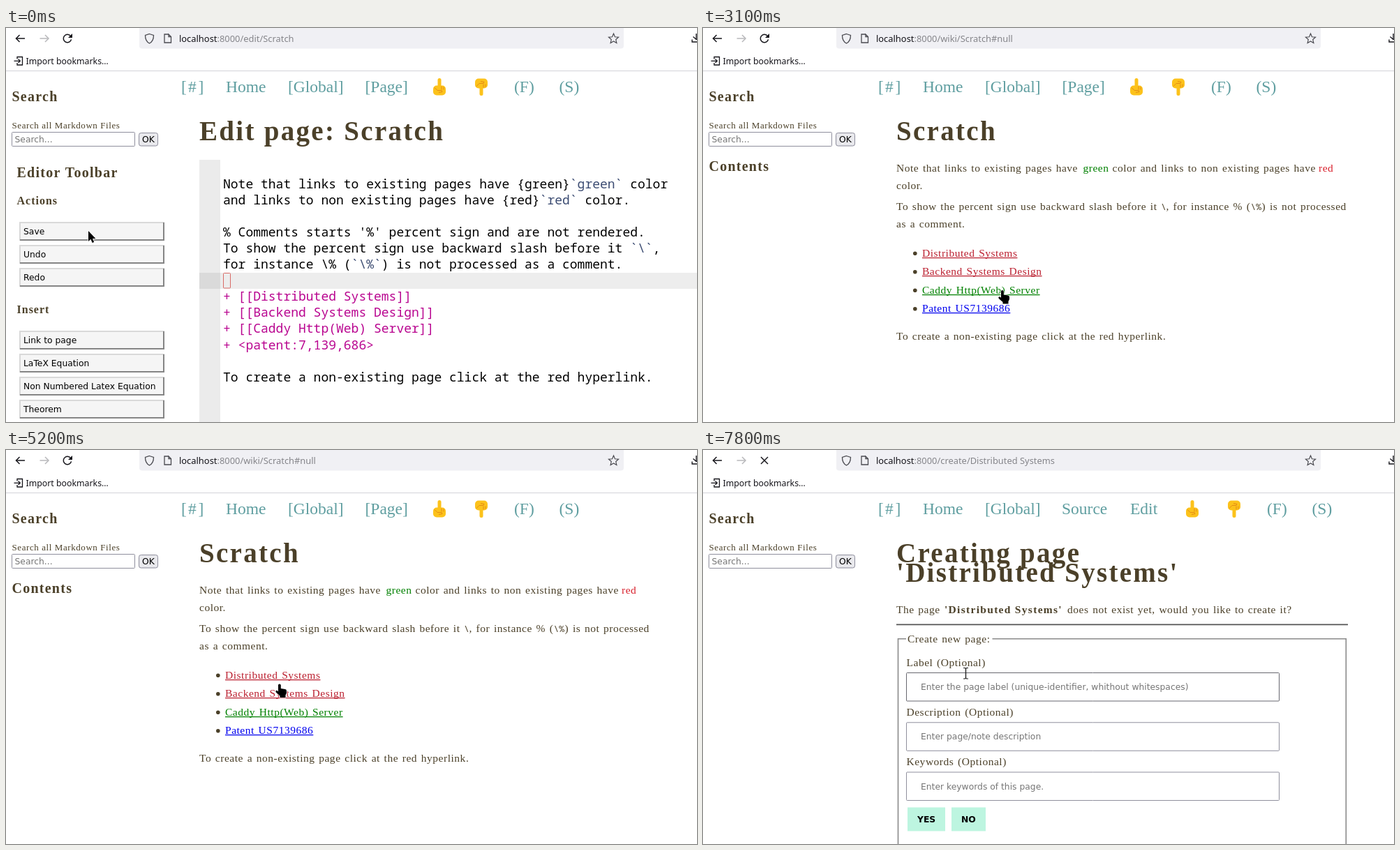
Animation, 990 px wide and 565 px high, one loop 8000 ms. Source, as an HTML page with a canvas:

```html
<!DOCTYPE html>
<html lang="en">
<head>
<meta charset="utf-8">
<title>Wiki page editing</title>
<style>
  html, body { margin: 0; width: 100%; height: 100%; overflow: hidden; background: #fff; }
  canvas { display: block; }
</style>
</head>
<body>
<canvas id="stage" width="990" height="565"></canvas>
<script>
const ctx = document.getElementById('stage').getContext('2d');
const LOOP = 8000, STEP = 100;
const INK = '#4b4029', TEAL = '#5f9ea0', DARK = '#15141a';
const RED = '#bb2030', GREEN = '#008000', BLUE = '#0000ee';
const MAGENTA = '#b90690', SLATE = '#3c4c72';
const SERIF = '"Liberation Serif", serif';
const SANS = '"DejaVu Sans", sans-serif';
const UI = '"Noto Sans", sans-serif';
const MONO = '"Noto Sans Mono", monospace';

const style = (font, color, letter = 0, word = 0) => ({ font, color, letter, word });
const S = {
  title: style(`bold 39px ${SERIF}`, INK, 2.3),
  section: style(`bold 20px ${SERIF}`, INK, 1.25),
  group: style(`bold 16px ${SERIF}`, INK, 1),
  hint: style(`13px ${SERIF}`, INK, 0.58),
  nav: style(`23.5px ${SERIF}`, TEAL),
  body: style(`15.5px ${SERIF}`, INK, 0.52, 1.3),
  strong: style(`bold 15.5px ${SERIF}`, INK, 1.3),
  inlineCode: style(`13px ${MONO}`, INK),
  code: style(`18px ${MONO}`, '#000'),
  form: style(`12.33px ${SANS}`, '#000'),
  formBold: style(`bold 12.33px ${SANS}`, '#000'),
  url: style(`12.9px ${UI}`, DARK),
  bookmark: style(`12.33px ${UI}`, DARK),
  tip: style(`12.25px ${UI}`, '#fff')
};

// Writes text on a baseline and returns its width.
function write(st, x, y, str, color = st.color) {
  ctx.font = st.font;
  ctx.letterSpacing = st.letter + 'px';
  ctx.wordSpacing = st.word + 'px';
  ctx.fillStyle = color;
  ctx.fillText(str, x, y);
  return ctx.measureText(str).width;
}

function fill(color, x, y, w, h, r = 0) {
  ctx.fillStyle = color;
  ctx.beginPath();
  ctx.roundRect(x, y, w, h, r);
  ctx.fill();
}

function frame(color, x, y, w, h, r = 0, width = 1) {
  ctx.strokeStyle = color;
  ctx.lineWidth = width;
  ctx.beginPath();
  ctx.roundRect(x, y, w, h, r);
  ctx.stroke();
}

function line(color, width, ...pts) {
  ctx.strokeStyle = color;
  ctx.lineWidth = width;
  ctx.beginPath();
  for (let i = 0; i < pts.length; i += 2) ctx.lineTo(pts[i], pts[i + 1]);
  ctx.stroke();
}

function at(x, y, draw) {
  ctx.save();
  ctx.translate(x, y);
  draw();
  ctx.restore();
}

// Linear interpolation over rows of [time, ...values].
function track(rows, t) {
  if (t <= rows[0][0]) return rows[0].slice(1);
  const i = rows.findIndex(r => r[0] > t);
  if (i < 0) return rows.at(-1).slice(1);
  const [a, b] = [rows[i - 1], rows[i]];
  const k = (t - a[0]) / (b[0] - a[0]);
  return a.slice(1).map((v, n) => v + (b[n + 1] - v) * k);
}

/* ---------- browser chrome ---------- */

function reloadIcon(color) {
  ctx.strokeStyle = color;
  ctx.lineWidth = 1.5;
  ctx.beginPath();
  ctx.arc(0, 0, 5.7, 0.25, Math.PI * 1.78);
  ctx.stroke();
  ctx.fillStyle = color;
  ctx.beginPath();
  ctx.moveTo(7, -7);
  ctx.lineTo(7, -1);
  ctx.lineTo(1, -1);
  ctx.fill();
}

function stopIcon() {
  line(DARK, 1.5, -5, -5, 5, 5);
  line(DARK, 1.5, 5, -5, -5, 5);
}

function arrowIcon(color, dir) {
  line(color, 1.5, -6 * dir, 0, 6.5 * dir, 0);
  line(color, 1.5, 1.5 * dir, -5, 6.5 * dir, 0, 1.5 * dir, 5);
}

function shieldIcon() {
  ctx.strokeStyle = '#4a4a50';
  ctx.lineWidth = 1.3;
  ctx.beginPath();
  ctx.moveTo(0, -6.5);
  ctx.lineTo(6, -4.5);
  ctx.bezierCurveTo(6, 2, 4, 5, 0, 7);
  ctx.bezierCurveTo(-4, 5, -6, 2, -6, -4.5);
  ctx.closePath();
  ctx.stroke();
}

function starIcon() {
  ctx.strokeStyle = '#4a4a50';
  ctx.lineWidth = 1.2;
  ctx.beginPath();
  for (let i = 0; i < 10; i++) {
    const a = -Math.PI / 2 + i * Math.PI / 5, r = i % 2 ? 3.4 : 7.4;
    ctx.lineTo(r * Math.cos(a), r * Math.sin(a));
  }
  ctx.closePath();
  ctx.stroke();
}

function chrome(path, icon) {
  fill('#f0f0f4', 191, 0, 694, 29.5, [0, 0, 4, 4]);
  at(21, 15, () => arrowIcon(DARK, -1));
  at(54.5, 15, () => arrowIcon('#b8b8bb', 1));
  at(88, 15, () => icon === 'stop' ? stopIcon() : reloadIcon(icon === 'dim' ? '#a5a5a8' : DARK));
  at(205.5, 15, shieldIcon);
  line('#4a4a50', 1.3, 233, 9, 227, 9, 227, 21, 236.5, 21, 236.5, 12.5, 233, 9, 233, 12.5, 236.5, 12.5);
  at(870.5, 15.5, starIcon);
  const host = write(S.url, 248, 20, 'localhost');
  write(S.url, 248 + host, 20, ':8000/' + path, '#85858a');

  line(DARK, 1.4, 989, 8, 989, 16);
  line(DARK, 1.4, 984.5, 12.5, 989, 16.5, 990, 16);
  line(DARK, 1.4, 983, 16.5, 983, 20, 990, 20);

  line(DARK, 1.3, 16, 44.5, 16, 41.5, 23.5, 41.5, 23.5, 53, 16, 53, 16, 50);
  line(DARK, 1.3, 11.5, 47.3, 20, 47.3);
  line(DARK, 1.3, 17.5, 44.5, 20.3, 47.3, 17.5, 50);
  write(S.bookmark, 28.5, 52, 'Import bookmarks…');
  fill('#d4d4d8', 0, 61, 990, 1);
}

/* ---------- shared page parts ---------- */

function pointer(x, flip) {
  at(x, 84.5, () => {
    ctx.scale(1, flip ? -1 : 1);
    fill('#fcc21b', -2.5, -12.5, 5, 15, 2.5);
    fill('#fcc21b', -9, -2, 18, 14, 5);
    line('#e48c15', 1, 3, -1, 3, 4);
    line('#e48c15', 1, 6, 0, 6, 4);
    line('#e48c15', 1, -7, 1, -3, 5, 3, 5, 4, 7, -1, 8);
  });
}

function nav(items, shift) {
  write(S.nav, 251, 92, '[');
  write(S.nav, 261, 92, '#');
  write(S.nav, 275.5, 92, ']');
  write(S.nav, 315, 92, 'Home');
  write(S.nav, 404, 92, '[Global]');
  for (const [x, label] of items) write(S.nav, x, 92, label);
  pointer(621 + shift, false);
  pointer(681 + shift, true);
  write(S.nav, 728 + shift, 92, '(F)');
  write(S.nav, 792.5 + shift, 92, '(S)');
}

function searchBox() {
  write(S.section, 8.5, 105, 'Search');
  write(S.hint, 8.5, 143.5, 'Search all Markdown Files');
  frame('#8f8f9d', 8.5, 149.5, 176, 20, 1);
  write(S.form, 12.5, 164, 'Search...', '#757575');
  fill('#e9e9ed', 190, 150, 28, 19.5, 3);
  frame('#8f8f9d', 190.5, 150.5, 27, 18.5, 3);
  write(S.form, 195, 164, 'OK');
}

/* ---------- pages ---------- */

function toolButton(y, label) {
  fill('#f5f5f5', 19, y, 208, 27);
  fill('#d9d9d9', 19, y, 208, 2);
  fill('#d9d9d9', 19, y, 2, 27);
  fill('#858585', 20, y + 25, 207, 2);
  fill('#858585', 225, y + 1, 2, 26);
  write(S.form, 25, y + 17.6, label);
}

// Code line; text between ^ marks takes the second colour.
function codeLine(row, str, color = '#000') {
  let x = 311;
  str.split('^').forEach((part, i) => {
    x += write(S.code, x, 229.5 + row * 23.1, part, i % 2 ? SLATE : color);
  });
}

function editPage() {
  nav([[514.5, '[Page]']], 0);
  searchBox();
  write(S.section, 15.5, 213.5, 'Editor Toolbar');
  write(S.group, 15.5, 252.5, 'Actions');
  ['Save', 'Undo', 'Redo'].forEach((s, i) => toolButton(278 + i * 33, s));
  write(S.group, 15.5, 409, 'Insert');
  ['Link to page', 'LaTeX Equation', 'Non Numbered Latex Equation', 'Theorem']
    .forEach((s, i) => toolButton(434 + i * 33, s));

  write(S.title, 277, 161, 'Edit page: Scratch');
  fill('#ebebeb', 277, 189, 30, 376);
  fill('#dadada', 277, 351, 30, 23);
  fill('#ededed', 307, 351, 683, 23);
  frame('#d96a66', 311.5, 351.5, 10, 21.5, 1);

  codeLine(0, 'Note that links to existing pages have {green}^`green`^ color');
  codeLine(1, 'and links to non existing pages have {red}^`red`^ color.');
  codeLine(3, "% Comments starts '%' percent sign and are not rendered.");
  codeLine(4, 'To show the percent sign use backward slash before it ^`\\`^,');
  codeLine(5, 'for instance \\% (^`\\%`^) is not processed as a comment.');
  ['[[Distributed Systems]]', '[[Backend Systems Design]]', '[[Caddy Http(Web) Server]]', '<patent:7,139,686>']
    .forEach((s, i) => codeLine(7 + i, '+ ' + s, MAGENTA));
  codeLine(12, 'To create a non-existing page click at the red hyperlink.');
}

function wikiPage() {
  nav([[514.5, '[Page]']], 0);
  searchBox();
  write(S.section, 8.5, 204.5, 'Contents');
  write(S.title, 277, 161, 'Scratch');

  write(S.body, 277, 205.5, 'Note that links to existing pages have');
  write(S.body, 544.5, 205.5, 'green', GREEN);
  write(S.body, 586.5, 205.5, 'color and links to non existing pages have');
  write(S.body, 882, 205.5, 'red', '#d8202c');
  write(S.body, 277, 230.5, 'color.');

  write(S.body, 277, 261, 'To show the percent sign use backward slash before it');
  write(S.inlineCode, 656, 261, '\\');
  write(S.body, 663.5, 261, ', for instance % (');
  write(S.inlineCode, 784.5, 261, '\\%');
  write(S.body, 800.5, 261, ') is not processed');
  write(S.body, 277, 286, 'as a comment.');

  [['Distributed Systems', RED], ['Backend Systems Design', RED],
   ['Caddy Http(Web) Server', GREEN], ['Patent US7139686', BLUE]].forEach(([label, color], i) => {
    const y = 327.5 + i * 26.5;
    fill(INK, 301, y - 7, 5.6, 5.6, 2.8);
    const w = write(S.body, 314, y, label, color);
    fill(color, 314, Math.round(y + 1), w, 1.2);
  });
  write(S.body, 277, 447, 'To create a non-existing page click at the red hyperlink.');
}

function field(y, label, hint, border) {
  write(S.body, 291.5, y - 9.5, label + ' (Optional)');
  frame(border, 291.5, y + 0.5, 534, 40.5, 1);
  write(S.form, 312, y + 25, hint, '#757575');
}

function createPage() {
  nav([[514, 'Source'], [612, 'Edit']], 80);
  searchBox();
  write(S.title, 277, 161, 'Creating page');
  write(S.title, 277, 189, "'Distributed Systems'");
  write(S.body, 277, 233.5, 'The page');
  write(S.strong, 346, 233.5, "'Distributed Systems'");
  write(S.body, 522, 233.5, 'does not exist yet, would you like to create it?');
  fill('#555', 277, 249.5, 647, 1.8);
  line('#8a8a8a', 1.6, 291, 270.7, 279.5, 270.7, 279.5, 566);
  line('#8a8a8a', 1.6, 414.5, 270.7, 921.3, 270.7, 921.3, 566);
  write(S.body, 293, 276, 'Create new page:');

  field(319, 'Label', 'Enter the page label (unique-identifier, whithout whitespaces)', '#67676f');
  field(390.3, 'Description', 'Enter page/note description', '#8f8f9d');
  field(461.5, 'Keywords', 'Enter keywords of this page.', '#8f8f9d');
  fill('#bdf5e0', 293, 512.5, 54, 34);
  write(S.formBold, 307, 533.5, 'YES');
  fill('#bdf5e0', 356, 512.5, 49, 34);
  write(S.formBold, 370, 533.5, 'NO');
}

function tooltip(alpha) {
  ctx.save();
  ctx.globalAlpha = alpha;
  fill('rgba(0,0,0,0.81)', 430, 398, 491.5, 58, 4);
  write(S.tip, 442.5, 423, 'Caddy web server configuration as file server, reverse proxy, load balancer or CA');
  write(S.tip, 442.5, 440.5, '- Certificate Authority.');
  ctx.restore();
}

/* ---------- mouse cursors ---------- */

function outlined(path) {
  ctx.lineJoin = 'round';
  ctx.strokeStyle = 'rgba(255,255,255,0.9)';
  ctx.lineWidth = 1.6;
  ctx.stroke(path);
  ctx.fillStyle = '#000';
  ctx.fill(path);
}

const arrowShape = new Path2D('M0 0V15L3.4 11.8 5.6 17 8.2 15.9 6 10.9H10.5Z');
const handShape = new Path2D(
  'M4 1.8Q4 0 5.8 0T7.8 1.8V6.5L14 7.6Q16 8 16 10V13L14.5 16V19.5H6.5V17L1 12.2Q-.6 10.5 1 9.6T4 11Z');

function beam() {
  line('#222', 1.2, -3.5, -7.5, -1, -7.5, 0, -6.5, 0, 7, -1, 8, -3.5, 8);
  line('#222', 1.2, 3.5, -7.5, 1, -7.5, 0, -6.5, 0, 7, 1, 8, 3.5, 8);
}

const arrowPath = [[1200, 118, 291], [1400, 135, 294], [1500, 172, 301], [1600, 218, 310],
  [1700, 257, 318], [1900, 318, 332], [2200, 382, 350], [2600, 429, 366]];
const handPath = [[4800, 423, 376], [4900, 410, 363], [5000, 391, 341], [5100, 388, 338],
  [5300, 384, 333], [5600, 378, 326], [5700, 378, 326], [5900, 370, 318]];
const tipFade = [[3400, 0], [3500, 0.5], [3600, 1], [4900, 1], [5000, 0.62], [5100, 0.28], [5200, 0]];

function cursor(t) {
  if (t >= 7800) return at(376.5, 320, beam);
  if (t >= 7400) return at(376, 319, () => outlined(arrowShape));
  if (t >= 3100) return at(...track(handPath, t), () => outlined(handShape));
  at(...track(arrowPath, t), () => outlined(arrowShape));
}

function address(t) {
  if (t < 1300) return 'edit/Scratch';
  return t < 7200 ? 'wiki/Scratch#null' : 'create/Distributed Systems';
}

function loadState(t) {
  if (t >= 1300 && t < 2500 || t >= 7100) return 'stop';
  return t >= 2500 && t < 3100 ? 'dim' : 'reload';
}

function draw(t) {
  fill('#fff', 0, 0, 990, 565);
  chrome(address(t), loadState(t));
  if (t < 1900) editPage();
  else if (t < 7800) wikiPage();
  else createPage();
  const [alpha] = track(tipFade, t);
  if (alpha > 0) tooltip(alpha);
  cursor(t);
}

const start = performance.now();
function tick() {
  const t = (performance.now() - start) % LOOP;
  draw(Math.floor(t / STEP) * STEP);
  requestAnimationFrame(tick);
}
tick();
</script>
</body>
</html>
```
